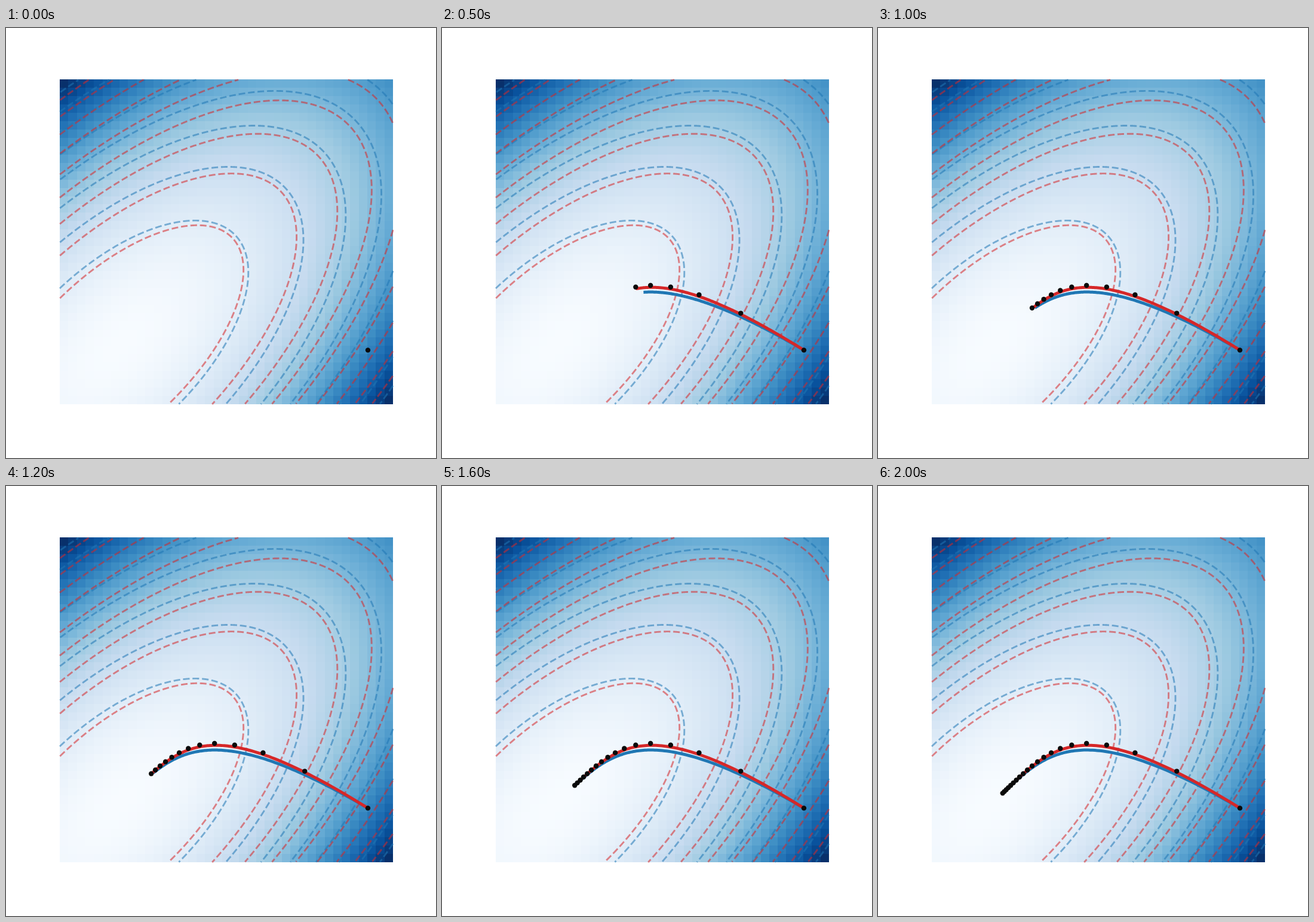
An HTML page with a canvas that plays this animation: 720x720 px, repeating every 2100 ms.

```html
<!DOCTYPE html>
<html lang="en">
<head>
<meta charset="utf-8">
<title>Gradient descent and gradient flow</title>
<style>
  html, body { margin: 0; width: 100%; height: 100%; overflow: hidden; background: #fff; }
  canvas { position: absolute; left: 0; top: 0; width: 720px; height: 720px; }
</style>
</head>
<body>
<canvas id="field" width="720" height="720"></canvas>
<canvas id="paths" width="720" height="720"></canvas>
<script>
const BOX = { left: 90, top: 86.4, right: 648, bottom: 630 };
const LOW = -1, HIGH = 5, CELLS = 39;
const LEVEL = 4.59, START = 4.548, RATE = 0.1;
const STEPS = 21, STEP_MS = 100;
const BLUE = '#1f77b4', RED = '#d62728';

// Curvatures along x + y and x - y
const LOSS = [1, 4];
const MODIFIED = LOSS.map(c => c * (1 + RATE * c / 2));

const BLUES = ['f7fbff', 'deebf7', 'c6dbef', '9ecae1', '6baed6', '4292c6', '2171b5', '08519c', '08306b']
  .map(hex => [0, 2, 4].map(i => parseInt(hex.slice(i, i + 2), 16)));

const px = x => BOX.left + (x - LOW) / (HIGH - LOW) * (BOX.right - BOX.left);
const py = y => BOX.bottom - (y - LOW) / (HIGH - LOW) * (BOX.bottom - BOX.top);
const fromAxes = (s, d) => [(s + d) / 2, (s - d) / 2];
const inside = v => v >= LOW && v <= HIGH;
const loss = (x, y) => ((x + y) ** 2 + 4 * (x - y) ** 2) / 4;

function shade(v) {
  const pos = Math.min(v, 1) * (BLUES.length - 1);
  const i = Math.min(Math.floor(pos), BLUES.length - 2);
  return `rgb(${BLUES[i].map((c, k) => Math.round(c + (BLUES[i + 1][k] - c) * (pos - i)))})`;
}

function drawMap(ctx) {
  const node = i => LOW + (HIGH - LOW) * i / CELLS;
  const peak = loss(node(0), node(CELLS - 1));
  for (let i = 0; i < CELLS; i++) {
    for (let j = 0; j < CELLS; j++) {
      const x0 = Math.round(px(node(i))), x1 = Math.round(px(node(i + 1)));
      const y0 = Math.round(py(node(j + 1))), y1 = Math.round(py(node(j)));
      ctx.fillStyle = shade(loss(node(i), node(j)) / peak);
      ctx.fillRect(x0, y0, x1 - x0, y1 - y0);
    }
  }
}

// Ellipses run clockwise; each visible piece starts at the plot edge
function drawContours(ctx, [a, b], color) {
  ctx.strokeStyle = color;
  for (let n = 1; n < 10; n++) {
    const rs = 2 * Math.sqrt(n * LEVEL / a), rd = 2 * Math.sqrt(n * LEVEL / b);
    let open = false;
    ctx.beginPath();
    for (let t = -Math.PI; t < Math.PI; t += 0.002) {
      const [x, y] = fromAxes(rs * Math.cos(t), rd * Math.sin(t));
      const visible = inside(x) && inside(y);
      if (visible) ctx[open ? 'lineTo' : 'moveTo'](px(x), py(y));
      open = visible;
    }
    ctx.stroke();
  }
}

function drawFlow(ctx, [a, b], color, end) {
  const count = 150;
  ctx.strokeStyle = color;
  ctx.beginPath();
  for (let i = 0; i <= count; i++) {
    const t = end * i / count;
    const [x, y] = fromAxes(START * Math.exp(-a * t), START * Math.exp(-b * t));
    ctx.lineTo(px(x), py(y));
  }
  ctx.stroke();
}

function drawDots(ctx, last) {
  ctx.fillStyle = '#0a0a0a';
  for (let k = 0; k <= last; k++) {
    const [x, y] = fromAxes(...LOSS.map(c => START * (1 - RATE * c) ** k));
    ctx.beginPath();
    ctx.arc(px(x), py(y), 4.2, 0, 2 * Math.PI);
    ctx.fill();
  }
}

const field = document.getElementById('field').getContext('2d');
drawMap(field);
field.lineWidth = 2.9;
field.globalAlpha = 0.55;
field.setLineDash([11.1, 4.8]);
drawContours(field, LOSS, BLUE);
drawContours(field, MODIFIED, RED);

const paths = document.getElementById('paths').getContext('2d');
paths.lineWidth = 5;
paths.lineCap = 'square';
paths.lineJoin = 'round';

const begin = performance.now();
let shown = -1;
function tick() {
  const step = Math.floor((performance.now() - begin) / STEP_MS) % STEPS;
  if (step !== shown) {
    shown = step;
    paths.clearRect(0, 0, 720, 720);
    if (step > 0) {
      drawFlow(paths, LOSS, BLUE, step * RATE);
      drawFlow(paths, MODIFIED, RED, step * RATE);
    }
    drawDots(paths, step);
  }
  requestAnimationFrame(tick);
}
tick();
</script>
</body>
</html>
```
